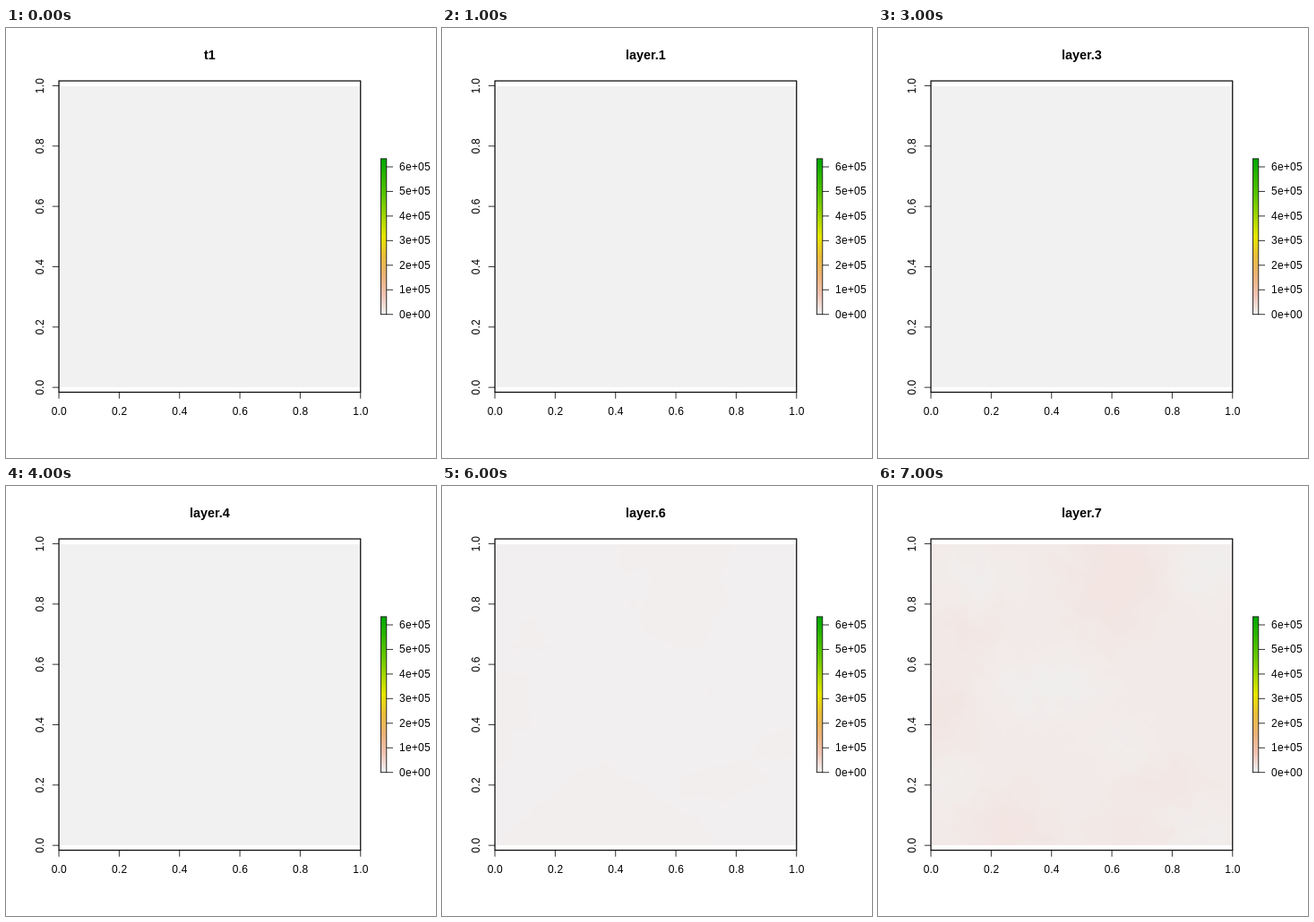
These frames come from a looping animation (480 by 480 pixels, 8000 ms). An HTML page:

```html
<!DOCTYPE html>
<html lang="en">
<head>
<meta charset="utf-8">
<title>Raster layers</title>
<style>
  html, body { margin: 0; width: 100%; height: 100%; overflow: hidden; background: #fff; }
  svg { display: block; width: 480px; height: 480px; font: 12px "Liberation Sans", Arial, sans-serif; }
  #title { font-weight: bold; font-size: 14.4px; text-anchor: middle; }
  #labels { letter-spacing: .02em; }
  #axes, .box { stroke: #000; stroke-width: .8; }
  .frame { fill: none; stroke-width: 1.2; }
  .mid { text-anchor: middle; }
</style>
</head>
<body>
<svg viewBox="0 0 480 480">
  <defs>
    <clipPath id="area"><rect x="59" y="65" width="337" height="336"/></clipPath>
    <linearGradient id="scale" x2="0" y2="1">
      <stop stop-color="#00a600"/>
      <stop offset=".25" stop-color="#63c600"/>
      <stop offset=".5" stop-color="#e6e600"/>
      <stop offset=".625" stop-color="#e9bd3a"/>
      <stop offset=".75" stop-color="#ecb176"/>
      <stop offset=".875" stop-color="#efc2b3"/>
      <stop offset="1" stop-color="#f2f2f2"/>
    </linearGradient>
    <filter id="ragged" filterUnits="userSpaceOnUse" x="40" y="45" width="375" height="375" color-interpolation-filters="sRGB">
      <feTurbulence type="fractalNoise" baseFrequency=".09" numOctaves="2" seed="4"/>
      <feDisplacementMap in="SourceGraphic" scale="8" xChannelSelector="R" yChannelSelector="G"/>
    </filter>
    <filter id="soft" filterUnits="userSpaceOnUse" x="0" y="0" width="480" height="480" color-interpolation-filters="sRGB">
      <feGaussianBlur stdDeviation="16" result="blur"/>
      <feTurbulence type="fractalNoise" baseFrequency=".04" numOctaves="3" seed="7" result="noise"/>
      <feDisplacementMap in="blur" in2="noise" scale="50" xChannelSelector="R" yChannelSelector="G"/>
    </filter>
  </defs>

  <g clip-path="url(#area)">
    <rect id="base" x="59" y="65" width="337" height="336"/>
    <path id="patches" fill="#f2eeed" filter="url(#ragged)" d="
      M192 50H325L322 76 317 88 312 106 319 122 316 136 302 146 298 164 293 178 280 181 262 179 240 170 223 161 222 148 226 130 230 116 235 104 232 92 218 93 206 97 196 86 200 75Z
      M208 126L218 128 218 143 211 140Z
      M87 152L105 149 109 162 119 180 112 185 99 179 87 181 76 188 76 178 89 171Z
      M45 207L96 211 98 270 78 274 75 286 83 294 70 310 45 306Z
      M66 415V393L90 373 115 350 135 335 160 315 190 308 195 325 220 330 237 345 262 360 285 372 302 390 296 415Z
      M264 345L268 328 282 321 300 315 322 310 346 306 352 318 371 322 350 334 326 343 318 355 302 347Z
      M346 296L360 278 385 271 396 283 390 300 372 306 350 303Z
      M297 222L304 222 305 233 297 233Z"/>
    <g id="clouds" filter="url(#soft)"></g>
  </g>

  <rect class="box frame" x="59.04" y="59.04" width="336.72" height="347.52"/>
  <rect class="box" x="418.5" y="145.9" width="6.3" height="173.8" fill="url(#scale)"/>
  <path id="axes"/>
  <g id="labels"></g>
  <text id="title" x="227.4" y="35"></text>
</svg>
<script>
const $ = id => document.getElementById(id);
const title = $("title"), base = $("base"), patches = $("patches"), clouds = $("clouds");
const left = 59.04, bottom = 406.56, zero = 401.16, step = 67.344;

let axes = "", labels = "";
for (let i = 0; i <= 5; i++) {
  const x = left + step * i, y = zero - step * i, value = (i / 5).toFixed(1);
  axes += `M${x} ${bottom}v7.2M${left} ${y}h-7.2`;
  labels += `<text class="mid" x="${x + .3}" y="432">${value}</text>
    <text class="mid" transform="translate(42 ${y}) rotate(-90)">${value}</text>`;
}
for (let i = 0; i <= 6; i++) {
  const y = 319.7 - 27.45 * i;
  axes += `M424.8 ${y}h7.2`;
  labels += `<text x="439" y="${Math.round(y + 4)}">${i}e+0${i && 5}</text>`;
}
$("axes").setAttribute("d", axes);
$("labels").innerHTML = labels;

// Soft regions: centre x, centre y, radius x, radius y
const ellipses = (color, list) => list.map(([x, y, rx, ry]) =>
  `<ellipse cx="${x}" cy="${y}" rx="${rx}" ry="${ry}" fill="${color}"/>`).join("");
clouds.innerHTML = '<rect width="480" height="480" fill="#f2eae8"/>' +
  ellipses("#f2e5e2", [[265, 105, 48, 62], [98, 165, 34, 20], [70, 250, 26, 45],
    [145, 382, 46, 34], [275, 385, 36, 18], [320, 332, 44, 16]]) +
  ellipses("#f0eeed", [[372, 90, 38, 40], [108, 100, 46, 26], [190, 225, 66, 32],
    [270, 288, 34, 18], [82, 336, 30, 22], [362, 385, 36, 22]]);

function draw(now) {
  const layer = Math.floor(now / 1000) % 8;
  title.textContent = layer ? "layer." + layer : "t1";
  base.setAttribute("fill", layer < 6 ? "#f1f1f1" : "#f1eff0");
  patches.style.display = layer === 6 ? "" : "none";
  clouds.style.display = layer === 7 ? "" : "none";
  requestAnimationFrame(draw);
}
draw(performance.now());
</script>
</body>
</html>
```
